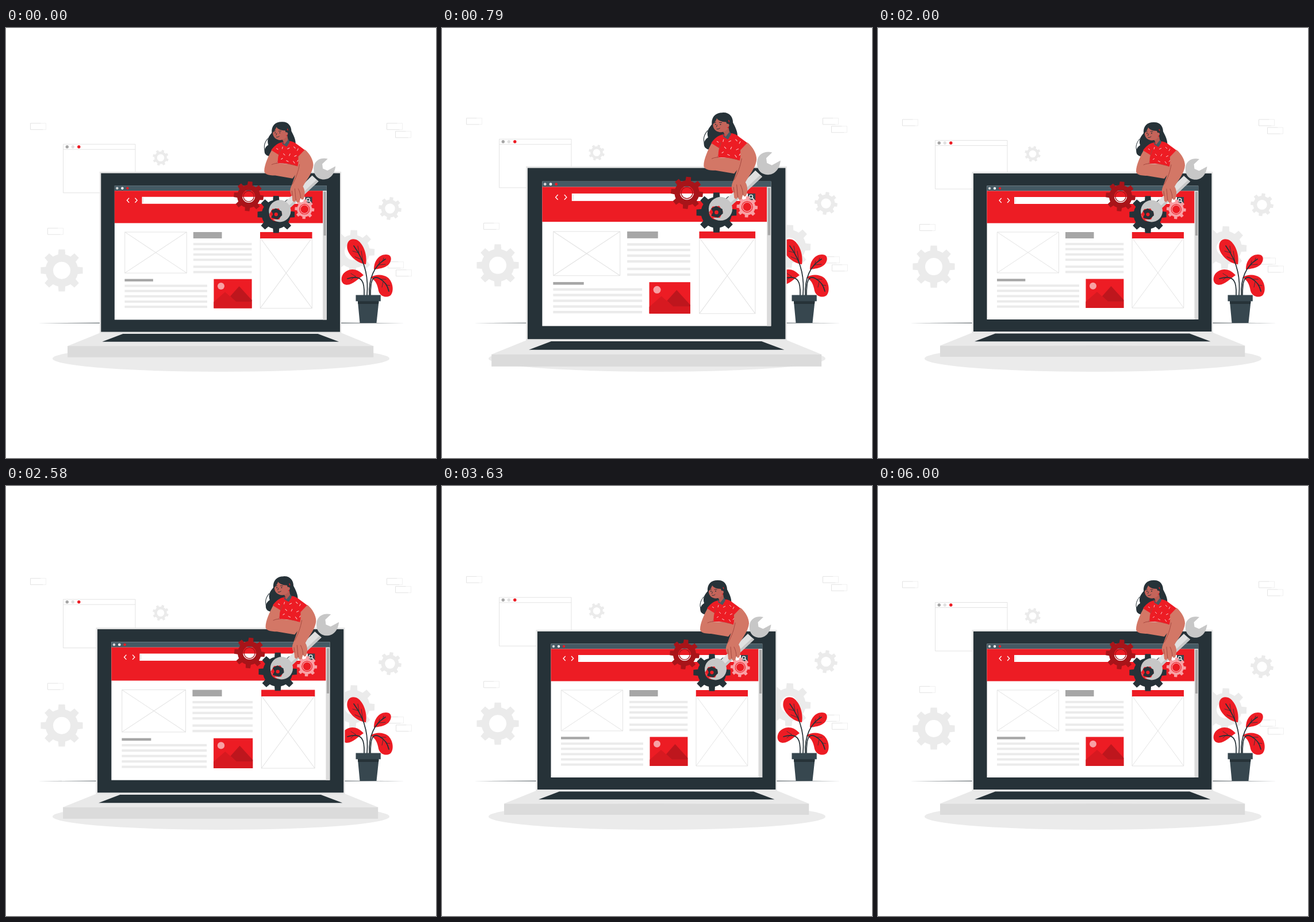
Write an HTML page that moves like this. It is 748 px wide and 748 px high and loops after 6040 ms.

```html
<!DOCTYPE html>
<html lang="en">
<head>
<meta charset="utf-8">
<title>Laptop maintenance</title>
<style>
html, body { margin: 0; width: 100%; height: 100%; overflow: hidden; background: #fff; }
svg { display: block; width: 100vw; height: 100vh; }
.line { fill: none; stroke: #e3e3e3; stroke-width: 1; }
.dark { fill: #263238; }
.red { fill: #ed1c24; }
.skin { fill: #d37766; }
.pen { fill: none; stroke: #263238; stroke-linecap: round; }
.fold { fill: none; stroke: #a3463f; stroke-width: .9; stroke-linecap: round; }
</style>
</head>
<body>
<svg id="stage" viewBox="0 0 748 748"></svg>
<script>
const LOOP = 6040, BEAT = 6000, FLOAT = 1500;

const rect = (x1, y1, x2, y2, fill) =>
  `<rect x="${x1}" y="${y1}" width="${x2 - x1}" height="${y2 - y1}" fill="${fill}"/>`;
const dot = (x, y, r, fill) => `<circle cx="${x}" cy="${y}" r="${r}" fill="${fill}"/>`;
const path = (d, cls, extra = '') => `<path d="${d}" class="${cls}" ${extra}/>`;
const bars = (x1, x2, ys) => ys.map(y => rect(x1, y - 2, x2, y + 2, '#ebebeb')).join('');
const crossed = (x1, y1, x2, y2) =>
  path(`M${x1} ${y1}H${x2}V${y2}H${x1}ZL${x2} ${y2}M${x2} ${y1}L${x1} ${y2}`, 'line');

// Eight-toothed wheel with an open centre
function gear(x, y, r, hole, turn, fill) {
  const at = (a, k) => (x + k * r * Math.sin(a)).toFixed(2) + ' ' + (y - k * r * Math.cos(a)).toFixed(2);
  let d = '';
  for (let i = 0; i < 8; i++) {
    const a = (i * 45 + turn) * Math.PI / 180, body = .77 * r;
    d += (i ? `A${body} ${body} 0 0 1 ` : 'M') + at(a - .22, .77) +
      'L' + at(a - .15, 1) + 'L' + at(a + .15, 1) + 'L' + at(a + .22, .77);
  }
  d += `A${.77 * r} ${.77 * r} 0 0 1 ${at(turn * Math.PI / 180 - .22, .77)}Z`;
  d += `M${x - hole} ${y}a${hole} ${hole} 0 1 0 ${2 * hole} 0a${hole} ${hole} 0 1 0 ${-2 * hole} 0Z`;
  return `<path d="${d}" fill="${fill}" fill-rule="evenodd"/>`;
}

const label = (x, y) => path(`M${x + 18} ${y}H${x}V${y + 11}H${x + 22}`, 'line') +
  path(`M${x + 18} ${y}H${x + 27}V${y + 11}H${x + 22}`, 'line', 'opacity=".5"');

const background = [
  path('M99.5 202.5H225V287H99.5ZM99.5 211.5H225', 'line'),
  dot(106.3, 207, 2.7, '#a6a6a6') + dot(116.3, 207, 2.7, '#e0e0e0') + dot(126.8, 207, 2.7, '#ed1c24'),
  label(42.5, 166), label(662.5, 166), label(677.5, 180), label(72.5, 348.5),
  label(664.5, 407), label(678.5, 421),
  gear(97, 422, 37, 15, 0, '#ebebeb'), gear(269, 226, 14, 6.3, 18, '#ebebeb'),
  gear(668, 314.3, 20, 8.7, 8, '#ebebeb'), gear(604, 389, 37.5, 15, 2, '#ebebeb')
].join('');

const plant = [
  path('M626 411C613 410 596 397 593.5 383C592 370 600 365 609 368C621 373 629 394 626 411Z', 'red'),
  path('M640 420C640 405 649 394 661 394C672 394 672 405 665 412C658 418 648 419 640 420Z', 'red'),
  path('M622 430C612 419 601 418 592 423C583 428 581 440 587 445C599 452 612 436 622 430Z', 'red'),
  path('M634 434C642 428 656 428 664 434C674 442 675 459 669 465C661 471 650 466 648 457C646 446 643 439 634 434Z', 'red'),
  path('M628 465C630 440 628 410 605 379M623 465C624 442 620 428 594 436M632 465C631 435 640 414 660 402M634 465C634 440 637 429 650 436C659 441 664 449 666 458', 'pen', 'stroke-width="1.7"'),
  path('M619 403L607 398M621 408L618 388M613 391L603 388M614 391L612 379M648 413L650 405M649 412L660 411M655 406L657 400M608 432L600 427M608 432L600 438M652 437L661 437M656 441L654 451M661 447L668 448', 'pen', 'stroke-width=".8"'),
  path('M612 476H648.5L644.5 513H615.5Z', '', 'fill="#37474f"'),
  path('M612 475H648.5L648 480H612.4Z', 'dark'),
  rect(608.5, 464.5, 651.8, 475.3, '#37474f')
].join('');

const laptop = [
  path('M164 530H583L638.3 552.5H108Z', '', 'fill="#e9e9e9"'),
  rect(108, 552.5, 638.3, 572, '#dbdbdb'),
  rect(163.5, 250.3, 582.5, 530.5, '#e6e6e6'),
  rect(166, 253, 580.3, 528, '#263238'),
  path('M204 531.5H542L578.5 545.2H168Z', 'dark'),
  rect(189.5, 274.5, 557.2, 507, '#fff'),
  rect(189.5, 274.5, 557.2, 283.5, '#455a64'),
  dot(194, 279, 2.2, '#d6d6d6') + dot(203, 279, 2.2, '#fff') + dot(212, 279, 2.2, '#ed1c24'),
  rect(189.5, 283.5, 550.5, 339.5, '#ed1c24'),
  rect(550.5, 283.5, 557.2, 507, '#dbdbdb') + rect(552, 285, 556, 361, '#a6a6a6'),
  path('M214.7 296L211 300L214.7 304M225 296L228.7 300L225 304', '', 'fill="none" stroke="#fff" stroke-width="1.3"'),
  rect(237, 294, 520, 306, '#fff') + rect(238.8, 295.5, 239.5, 304.5, '#c7c7c7'),
  rect(520, 294, 532, 306, '#37474f'),
  '<circle cx="525" cy="299" r="2.7" fill="none" stroke="#fff" stroke-width="1.2"/>',
  path('M527 301L530 304', '', 'stroke="#fff" stroke-width="1.4"'),
  crossed(207.3, 355, 314.5, 426),
  rect(326, 355, 375.5, 366, '#a6a6a6'),
  bars(326, 427.3, [375.8, 384.7, 393.9, 403.1, 415.2, 424.4]),
  rect(207, 436.3, 256.3, 440.6, '#a6a6a6'),
  bars(207, 350, [448.2, 457.2, 466.4, 475.6, 484.6]),
  rect(361.5, 436.5, 427.4, 487, '#ed1c24'),
  dot(374, 448.7, 6, '#f7a1a4'),
  path('M361.5 476L381 459L400 475.7H427.4V487H361.5Z', '', 'fill="#d71920"'),
  path('M390 466.5L405.5 449L427.4 473V475.7H400Z', '', 'fill="#be161d"'),
  crossed(442, 365, 531.8, 487),
  rect(441.8, 355, 532, 366, '#ed1c24')
].join('');

const gears = [
  gear(422, 293, 26, 11, 6, '#a81419'),
  '<circle cx="422" cy="293" r="9.2" fill="none" stroke="#a81419" stroke-width="1.3"/>',
  gear(469.5, 324.5, 32.5, 12, 0, '#263238'),
  gear(518.8, 315.5, 17, 9, 4, '#f9a0a4'),
  dot(518.8, 315.5, 9, '#ed1c24'),
  '<circle cx="518.8" cy="315.5" r="7.4" fill="none" stroke="#f9a0a4" stroke-width="1.3"/>'
].join('');

const wrench = [
  path('M484 304L532 257L543 267L494 313Z', '', 'fill="#e0e0e0"'),
  path('M494 313L543 267L540 264L491 310Z', '', 'fill="#c7c7c7"'),
  path('M559 228C548 225 538 230 535.5 239C533 248 536 258 544 262C555 267 570 262 572.5 241L558.5 248.5L550.5 245L549.5 237Z', '', 'fill="#c7c7c7"'),
  dot(476, 318.5, 19, '#c7c7c7'),
  path('M458 324L463 315L474 314L480 323L475 333L463 333Z', 'red'),
  path('M461 318L469 314L479 319L480 326L472 333L461 330L464 324Z', 'dark'),
  dot(469.5, 324.3, 3.1, '#ed1c24')
].join('');

const woman = [
  // hair behind the head
  path('M479 164C490 163 496 171 496 180C499 186 505 196 503 206C497 209 488 201 484 197C479 208 466 214 457 223C447 222 447 209 456 204C453 194 457 189 462 183C461 171 468 164 479 164Z', 'dark'),
  path('M455 193C447 203 449 209 450 214C451 219 453 221 457 223', 'pen', 'stroke-width="1"'),
  // resting arm
  path('M463 211C456 223 449 239 449 249C449 255 457 257 468 257L498 262L510 247L507 238L471 236L476 221Z', 'skin'),
  path('M462 238C472 233 490 236 505 240M471 236L475 226', 'fold'),
  // shirt
  path('M481 199C472 200 465 207 461 213L474 221C472 227 473 232 472 236C486 235 499 238 509 242C513 235 513 227 515 220L519.5 213L506 203C500 198 494 196 490 198Z', 'red'),
  path('M474 221L477 212M513 221L506 226', 'fold'),
  path('M470 210L473 212M481 207L480 211M489 211L493 209M500 207L503 210M508 210L506 214M482 219L485 222M494 219L492 223M501 224L505 222M478 229L481 227M487 231L491 233M499 232L502 236M508 230L506 233', '', 'fill="none" stroke="#f7c5c5" stroke-width="1"'),
  path('M480 194L489 188L491 199L485 204Z', '', 'fill="#b55b52"'),
  path('M479 197L484 203L491 194L493 199L488 207L481 203Z', '', 'fill="#455a64"'),
  // face
  path('M465 177C468 170 478 170 486 177L489 186C488 193 480 197 473 195C465 193 462 185 465 177Z', '', 'fill="#c4645a"'),
  path('M464 183C462 173 468 165 480 165C492 165 496 176 493 187L487 184L485 179C477 179 472 176 470 173C469 177 466 180 464 183Z', 'dark'),
  dot(487.3, 184.5, 2.6, '#c4645a') + dot(488, 188, 1, '#ed1c24'),
  dot(468, 183, .9, '#263238') + dot(476, 183, .9, '#263238'),
  path('M465.5 180.5L468.5 179.5M474 180L478 180M470.5 184L469.5 187M470 190.5Q473 191 475 189', 'pen', 'stroke-width=".9"'),
  path('M489 176L490 179', '', 'stroke="#ed1c24" stroke-width="1.3"')
].join('');

const hand = [
  path('M519.5 212C528 219 534 230 534 239C533 253 521 266 516 276C520 282 520 291 517 298L514 299L512 296L510 303L506 304L504 300L501 303L498 301L497 292C493 288 493 281 496 275C500 264 506 248 508 235L508 224Z', 'skin'),
  path('M510 238C508 250 504 261 498 272M502 280C503 288 503 295 504 300M508 280C511 286 512 291 512 296M497 284L498 292', 'fold')
].join('');

document.getElementById('stage').innerHTML =
  `<g id="floaters">${background}</g>` +
  path('M55 513.2L200 512.6H550L694 513.2L550 513.7H200Z', 'dark') +
  '<ellipse cx="374" cy="575" rx="293" ry="23" fill="#ebebeb"/>' +
  plant +
  `<g id="beating">${laptop + gears + wrench + woman + hand}</g>`;

const floaters = document.getElementById('floaters');
const beating = document.getElementById('beating');

// Triangular pulse between three moments
const pulse = (p, a, top, b) => Math.max(0, Math.min((p - a) / (top - a), (b - p) / (b - top)));

function draw(now) {
  const time = Math.min(now % LOOP + 20, BEAT);
  const lift = 10 * pulse(time % FLOAT / FLOAT, 0, .5, 1);
  const p = time / BEAT;
  const scale = 1 + .1 * (pulse(p, 0, .1, .3) + pulse(p, .4, .5, .6));
  floaters.setAttribute('transform', `translate(0 ${-lift})`);
  beating.setAttribute('transform', `translate(373 368) scale(${scale}) translate(-373 -368)`);
}

const start = performance.now();
function tick() {
  draw(performance.now() - start);
  requestAnimationFrame(tick);
}
tick();
</script>
</body>
</html>
```
